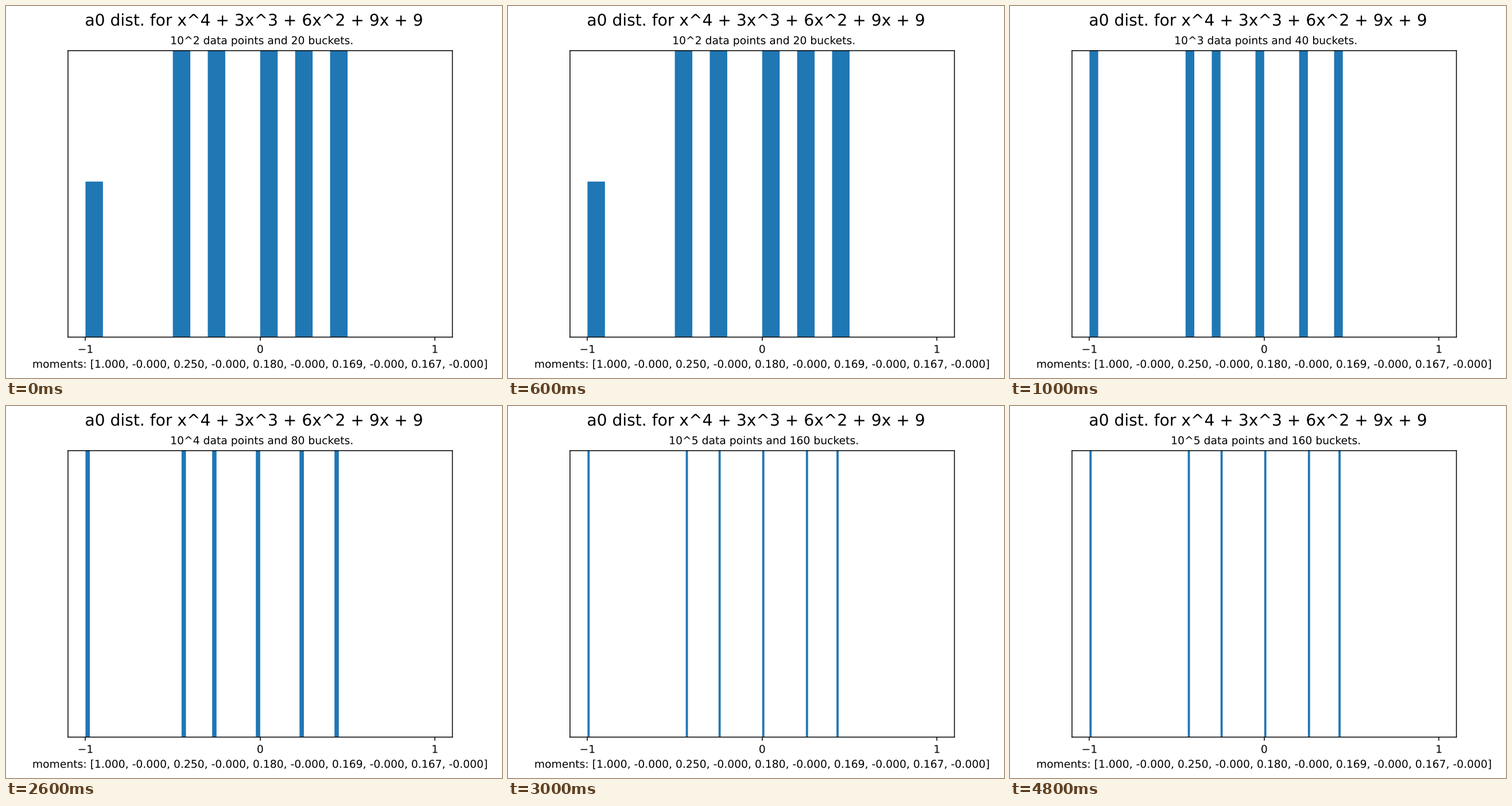
Animation of 864 by 648 pixels, one loop 6000 ms. Source, as a matplotlib script:

```python
import matplotlib.pyplot as plt
import numpy as np
from matplotlib.animation import FuncAnimation
from matplotlib.patheffects import Normal

# Draw text and edges at subpixel positions.
plt.rcParams.update({
    "font.family": "DejaVu Sans",
    "text.hinting": "none",
    "path.snap": False,
    "path.effects": [Normal()],
})

STAGES = 4
COUNT_LIMIT = 15.35

# Twelve equally likely values: the inner ones come twice, -1 and 1 once.
inner = np.sin(np.arange(-2, 3) * np.pi / 6) / 2
values = np.concatenate(([-1, 1], inner, inner))
moments = [np.mean((values - 1e-6) ** n) for n in range(10)]
visible = np.concatenate(([-1], inner))

fig, ax = plt.subplots(figsize=(6.4, 4.8), dpi=135)
fig.suptitle("a0 dist. for x^4 + 3x^3 + 6x^2 + 9x + 9", fontsize=15)
ax.set_xlabel("moments: [" + ", ".join(f"{m:.3f}" for m in moments) + "]")
ax.set_xticks([-1, 0, 1])
ax.set_yticks([])
bars = []


def draw(frame):
    stage = min(frame, STAGES - 1)
    exponent = stage + 2
    buckets = 20 * 2 ** stage
    width = 2 / buckets

    # Sampling error decides the bucket of values that lie on an edge.
    error = 0.001 * np.cos(stage * 2 * np.pi / 3)
    filled = np.floor((visible + error + 1) / width).clip(0)
    counts = 10 ** exponent * np.where(visible == -1, 1, 2) / len(values)

    while bars:
        bars.pop().remove()
    bars.extend(ax.bar(-1 + filled * width, counts, width,
                       align="edge", color="tab:blue"))
    ax.set_xlim(-1.1, 1.1)
    ax.set_ylim(0, COUNT_LIMIT)
    ax.set_title(f" 10^{exponent} data points and {buckets} buckets.", fontsize=10)
    return bars


anim = FuncAnimation(fig, draw, frames=6, interval=1000, init_func=lambda: draw(0),
                     repeat=True, repeat_delay=0)
plt.show()
```
